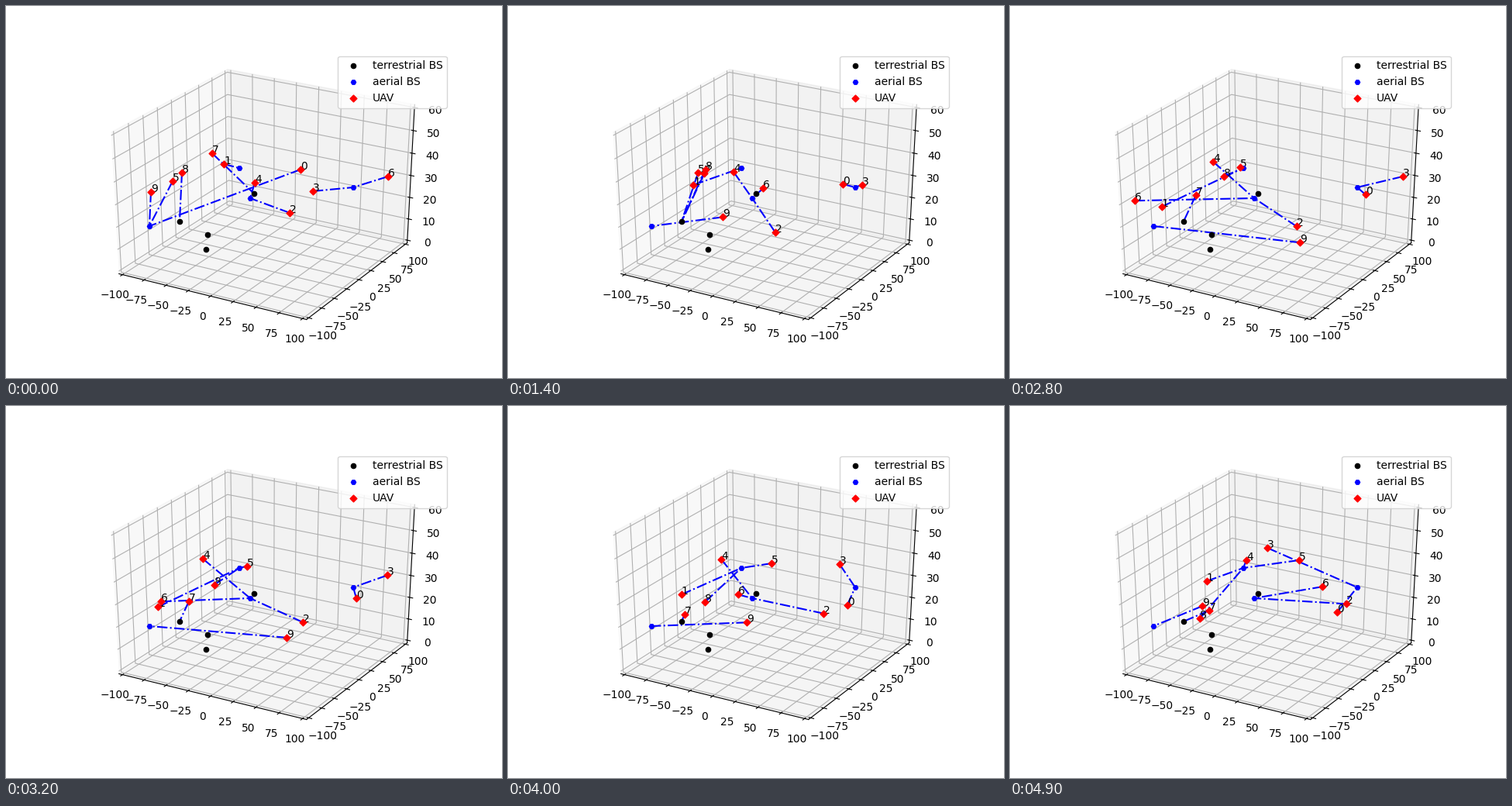
Animation, 640 px wide and 480 px high, one loop 5000 ms. Source, as a matplotlib script:

```python
import matplotlib.pyplot as plt
import numpy as np
from matplotlib.animation import FuncAnimation
from mpl_toolkits.mplot3d import proj3d

WIDTH, HEIGHT, DPI = 640, 480, 100
FRAMES, INTERVAL = 50, 100
LIMIT, ALTITUDE = 100, 30

# Stations in stage pixels.
GROUND = {"P": (224, 278), "Q": (260, 295), "R": (258, 314), "S": (320, 242)}
AIR = {"A": (185, 284), "B": (301, 209), "C": (315, 248), "D": (448, 234)}
STATIONS = {**GROUND, **AIR}

# Each vehicle: start x, y and velocity per step, in axis units.
VEHICLES = [
    (2.9, 64.2, 3.77, -1.02),
    (-70.2, 39.0, 0.12, -4.52),
    (48.6, -38.5, 0.665, -3.41),
    (41.1, 20.1, 2.25, 2.7),
    (-18.4, 11.3, -2.415, 0.93),
    (-89.6, -25.1, -1.93, 2.218),
    (86.1, 90.6, -6.55, -6.37),
    (-95.8, 59.0, 1.48, -3.77),
    (-93.8, -1.4, -1.7, 1.3),
    (-92.6, -59.5, 6.46, -1.45),
]
# (step, vehicle): new velocity or new serving station from then on.
TURNS = {(28, 0): (-0.12, -2.53), (24, 8): (1.7, -5.35),
         (31, 3): (-4.35, 0.1), (36, 3): (-9.66, 0.34)}
FIRST_LINKS = "ABCDCADSPA"
HANDOVERS = {(4, 0): "D", (4, 5): "P", (10, 6): "C", (14, 7): "P",
             (23, 5): "B", (23, 8): "B", (46, 4): "B"}


def fly(index):
    """Positions at every step; a move that would leave the area is mirrored."""
    state = np.array(VEHICLES[index], dtype=float)
    place, velocity = state[:2], state[2:]
    track = []
    for step in range(FRAMES):
        track.append(place.copy())
        velocity = np.array(TURNS.get((step, index), velocity))
        outside = np.abs(place + velocity) > LIMIT
        velocity = np.where(outside, -velocity, velocity)
        place = place + velocity
    return np.array(track)


def serving_stations(index):
    name, points = FIRST_LINKS[index], []
    for step in range(FRAMES):
        name = HANDOVERS.get((step, index), name)
        points.append(STATIONS[name])
    return points


def padded(low, high):
    margin = (high - low) / 48
    return low - margin, high + margin


fig = plt.figure(figsize=(WIDTH / DPI, HEIGHT / DPI), dpi=DPI)

box = fig.add_subplot(projection="3d")
box.apply_aspect = lambda position=None: None  # fill the whole subplot
box.view_init(elev=30, azim=-60)
box.set_box_aspect((1, 1, 1), zoom=np.sqrt(3) / 1.8294640721620434)
box.set_xticks(range(-LIMIT, LIMIT + 1, 25))
box.set_yticks(range(-LIMIT, LIMIT + 1, 25))
box.set_zticks(range(0, 61, 10))
box.set_xlim(*padded(-LIMIT, LIMIT))
box.set_ylim(*padded(-LIMIT, LIMIT))
box.set_zlim(*padded(0, 60))

# Flat layer in stage pixels above the box.
stage = fig.add_axes([0, 0, 1, 1])
stage.set_xlim(0, WIDTH)
stage.set_ylim(HEIGHT, 0)
stage.axis("off")


def to_stage(track):
    height = np.full(len(track), ALTITUDE)
    x, y, _ = proj3d.proj_transform(track[:, 0], track[:, 1], height,
                                    box.get_proj())
    pixels = box.transData.transform(np.column_stack([x, y]))
    return np.column_stack([pixels[:, 0], HEIGHT - pixels[:, 1]])


def markers(points, color, marker, label):
    return stage.scatter(*zip(*points), s=20, c=color, marker=marker,
                         label=label, zorder=4)


count = len(VEHICLES)
tracks = [to_stage(fly(i)) for i in range(count)]
links = [serving_stations(i) for i in range(count)]

ground = markers(GROUND.values(), "black", "o", "terrestrial BS")
air = markers(AIR.values(), "blue", "H", "aerial BS")
vehicles = markers([track[0] for track in tracks], "red", "D", "UAV")
lines = [stage.plot([], [], "b-.")[0] for _ in range(count)]
labels = [stage.text(0, 0, str(i)) for i in range(count)]
box.legend(handles=[ground, air, vehicles], loc="upper right")


def update(frame):
    vehicles.set_offsets([track[frame] for track in tracks])
    for track, link, line, label in zip(tracks, links, lines, labels):
        line.set_data(*zip(track[frame], link[frame]))
        label.set_position(track[frame])
    return [vehicles, *lines, *labels]


anim = FuncAnimation(fig, update, frames=FRAMES, interval=INTERVAL,
                     repeat=True, repeat_delay=0, blit=False)
plt.show()
```
